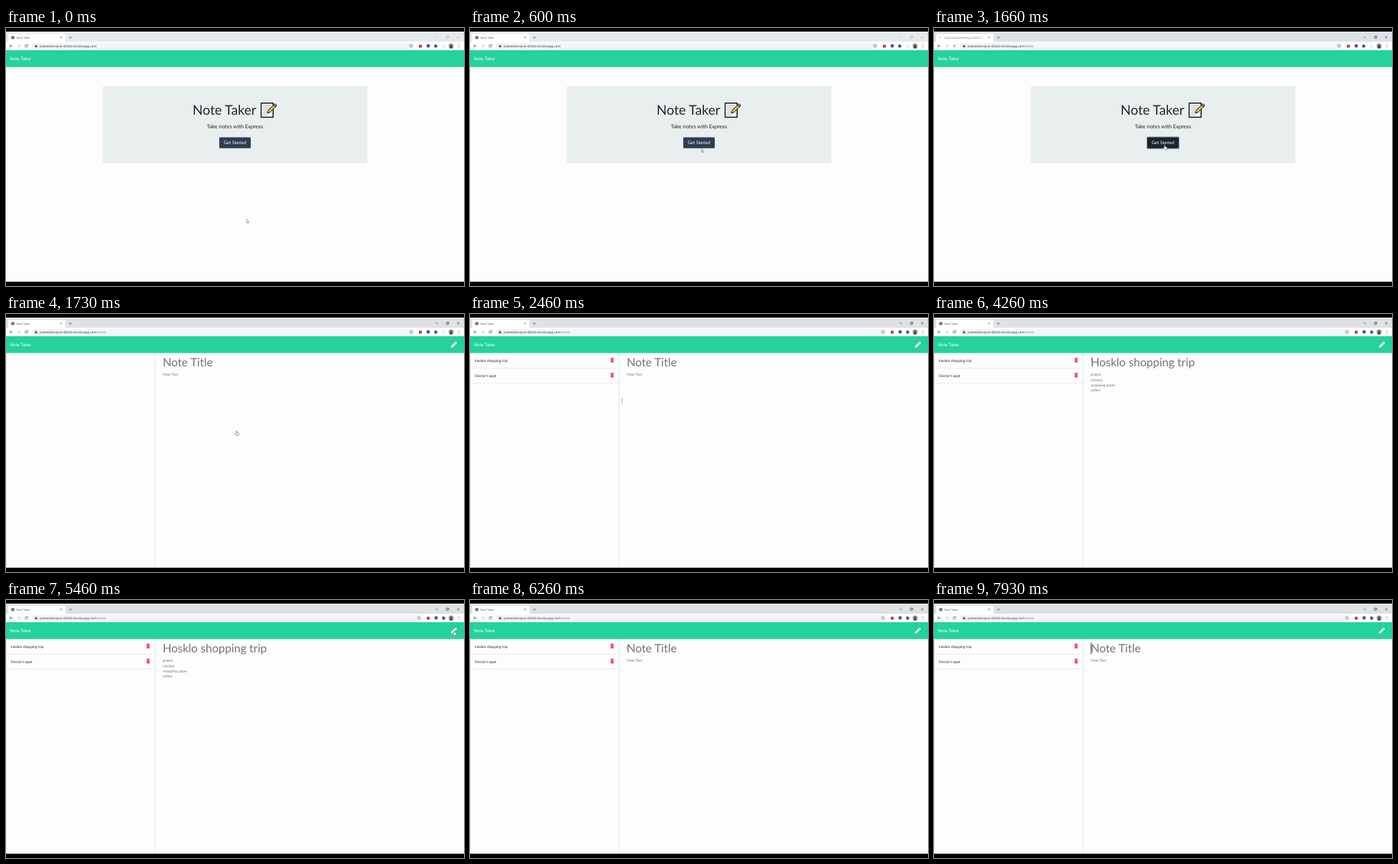
An HTML page with a canvas for the animation above (8000 ms loop, 640x360 px).

```html
<!DOCTYPE html>
<html lang="en">
<head>
<meta charset="utf-8">
<title>Note Taker</title>
<style>
  html, body { margin: 0; width: 100%; height: 100%; overflow: hidden; background: #000; }
  canvas { display: block; width: 100%; height: 100%; }
</style>
</head>
<body>
<canvas id="stage"></canvas>
<script>
const W = 640, H = 360, LOOP = 8000, STEP = 200 / 3;
const canvas = document.getElementById('stage');
const ctx = canvas.getContext('2d');
const PAGE_FONT = 'Lato, sans-serif';
const UI_FONT = '"Open Sans", "Noto Sans", sans-serif';
const STORE = 'Hosklo shopping trip';
const ITEMS = ['grapes', 'chicken', 'wrapping paper', 'coffee'];

// Moments at which the interface switches, in ms
const AT = {
  hover: 860, press: 1260, load: 1330, commit: 1600, notes: 1730, list: 1800,
  icons: 2000, open: 3660, clear: 5600
};
const CARET = [[6000, 6260], [6860, 7400], [7930, LOOP]];

// Pointer moves: start, end, x, y
const MOVES = [
  [0, 600, 323.5, 168], [666, 866, 322.3, 162.8],
  [2200, 2533, 200, 116], [2733, 3266, 115.5, 65.6],
  [3933, 4066, 135, 67], [4133, 4333, 250, 62],
  [4866, 5266, 622, 44], [5400, 5466, 626.4, 42.4],
  [5600, 6000, 219.5, 67]
];

function box(x, y, w, h, fill, r = 0) {
  ctx.fillStyle = fill;
  ctx.beginPath();
  ctx.roundRect(x, y, w, h, r);
  ctx.fill();
}

function disc(x, y, r, fill) {
  ctx.fillStyle = fill;
  ctx.beginPath();
  ctx.arc(x, y, r, 0, 7);
  ctx.fill();
}

function arc(x, y, r, from, to, color, width) {
  ctx.strokeStyle = color;
  ctx.lineWidth = width;
  ctx.beginPath();
  ctx.arc(x, y, r, from, to);
  ctx.stroke();
}

function line(points, color, width) {
  ctx.strokeStyle = color;
  ctx.lineWidth = width;
  ctx.beginPath();
  for (let i = 0; i < points.length; i += 2) ctx.lineTo(points[i], points[i + 1]);
  ctx.stroke();
}

function shape(points, fill) {
  ctx.fillStyle = fill;
  ctx.beginPath();
  for (let i = 0; i < points.length; i += 2) ctx.lineTo(points[i], points[i + 1]);
  ctx.closePath();
  ctx.fill();
}

function cross(x, y, r, color, width = 0.6) {
  line([x - r, y - r, x + r, y + r], color, width);
  line([x - r, y + r, x + r, y - r], color, width);
}

function text(str, x, y, size, color, font = PAGE_FONT, align = 'left') {
  ctx.font = `${size}px ${font}`;
  ctx.textAlign = align;
  ctx.fillStyle = color;
  ctx.fillText(str, x, y);
}

function at(x, y, draw) {
  ctx.save();
  ctx.translate(x, y);
  draw();
  ctx.restore();
}

function drawTab(ms, loading) {
  const focused = ms >= AT.press;
  box(0, 5, W, 14.5, focused ? '#dee1e6' : '#e7eaed');
  box(3, 8, 80, 12, '#fff', [2.5, 2.5, 0, 0]);
  if (loading) {
    const a = ms / 110;
    arc(9.5, 13.3, 1.9, a, a + 1.6, '#9aa0a6', 0.6);
  } else {
    disc(9.5, 13.3, 2.4, '#55595e');
    line([7.8, 12.6, 9.2, 13.2, 8.9, 14.8], '#d5d8db', 0.6);
    line([10, 11.6, 10.4, 12.9, 11.3, 13.6], '#d5d8db', 0.6);
  }
  if (ms >= AT.commit && ms < AT.notes) {
    const fade = ctx.createLinearGradient(60, 0, 73, 0);
    fade.addColorStop(0, '#5f6368');
    fade.addColorStop(1, 'rgba(95,99,104,0)');
    text('https://protected-eyrie-40326.h', 14.5, 14.7, 3.75, fade, UI_FONT);
  } else {
    text('Note Taker', 14.5, 14.7, 3.75, '#4b4f54', UI_FONT);
  }
  cross(77, 13.3, 1.2, '#5f6368');
  line([88, 13.3, 92, 13.3], '#5f6368', 0.6);
  line([90, 11.3, 90, 15.3], '#5f6368', 0.6);

  const ctl = focused ? '#202124' : '#a9adb2';
  line([600, 13, 603.4, 13], ctl, 0.5);
  ctx.strokeStyle = ctl;
  ctx.lineWidth = 0.5;
  ctx.strokeRect(615.3, 11.9, 2.6, 2.6);
  line([616.2, 11.9, 616.2, 11.1, 618.7, 11.1, 618.7, 13.6, 617.9, 13.6], ctl, 0.4);
  cross(632, 13, 1.6, ctl, 0.5);
}

function drawToolbar(ms, loading) {
  const shift = ms >= AT.icons ? 11 : 0;
  box(0, 19.5, W, 11.5, '#fff');
  box(36, 20.7, 536 + shift, 9.2, '#f4f5f6', 4.6);
  const ink = '#4f5358';
  line([9.4, 25, 5.2, 25], ink, 0.7);
  line([7.2, 23, 5.2, 25, 7.2, 27], ink, 0.7);
  line([16, 25, 20, 25], '#b9bcc0', 0.7);
  line([18, 23, 20, 25, 18, 27], '#b9bcc0', 0.7);
  if (loading) {
    cross(28.5, 25, 1.7, ink, 0.7);
  } else {
    arc(28.5, 25, 1.9, 0.3, 5.4, ink, 0.7);
    shape([30.8, 22.7, 30.8, 24.8, 28.7, 24.8], ink);
  }
  box(40.4, 24.4, 3.2, 2.6, ink, 0.4);
  arc(42, 24.4, 1, Math.PI, 0, ink, 0.5);
  text('protected-eyrie-40326.herokuapp.com', 47, 26.6, 4.45, '#2b2e32', UI_FONT);
  if (ms >= AT.commit) {
    const w = ctx.measureText('protected-eyrie-40326.herokuapp.com').width;
    text('/notes', 47 + w, 26.6, 4.45, '#75797e', UI_FONT);
  }

  at(566 + shift, 25, () => {
    const star = [];
    for (let i = 0; i <= 10; i++) {
      const a = i * Math.PI / 5 - Math.PI / 2, r = i % 2 ? 1.1 : 2.5;
      star.push(r * Math.cos(a), r * Math.sin(a));
    }
    line(star, '#5f6368', 0.5);
  });
  box(577 + shift, 23.4, 4, 4, '#d9303c');
  disc(590 + shift, 25, 2.4, '#4a5a92');
  at(600.3 + shift, 25, () => {
    box(-2, -1.3, 3.8, 3.6, '#4f5358', 0.4);
    disc(-0.2, -1.6, 0.9, '#4f5358');
    disc(2, 0.4, 0.9, '#4f5358');
    disc(-1.9, 0.5, 0.7, '#fff');
  });
  if (!shift) {
    line([609, 23.6, 613, 23.6], '#c3c6ca', 0.5);
    line([609, 25.2, 611.6, 25.2], '#c3c6ca', 0.5);
    line([609, 26.8, 611, 26.8], '#c3c6ca', 0.5);
    disc(612.7, 26.4, 0.8, '#c3c6ca');
  }
  disc(622, 25, 3.5, '#a99a90');
  ctx.save();
  ctx.beginPath();
  ctx.arc(622, 25, 3.5, 0, 7);
  ctx.clip();
  disc(622, 24.4, 1.5, '#51413b');
  disc(622, 28.3, 2.5, '#51413b');
  ctx.restore();
  for (let i = -1; i <= 1; i++) disc(632.8, 25 + i * 1.6, 0.5, '#4f5358');
}

function drawHeader(ms) {
  box(0, 31, W, 23.5, '#25d29d');
  text('Note Taker', 5.3, 45.2, 6.25, '#fff');
  if (ms < AT.notes) return;
  at(625.6, 43, () => {
    ctx.rotate(-Math.PI / 4);
    box(-3.6, -1.5, 6.3, 3, '#fff');
    box(3.2, -1.5, 2, 3, '#fff', 0.6);
    shape([-3.6, -1.5, -3.6, 1.5, -5.6, 0], '#fff');
  });
}

function drawMemo() {
  ctx.lineJoin = 'round';
  box(356.3, 104.6, 17.2, 20, '#f4f6f6', 1);
  ctx.strokeStyle = '#16191b';
  ctx.lineWidth = 1.5;
  ctx.strokeRect(356.5, 104.8, 16.8, 19.6);
  for (let i = 0; i < 6; i++) {
    line([359, 108.5 + i * 2.5, i === 5 ? 366 : 371, 108.5 + i * 2.5], '#9ea5a8', 0.7);
  }
  at(377, 107, () => {
    ctx.rotate(2.36);
    box(-0.6, -2.1, 14.6, 4.2, '#16191b', 0.8);
    box(0.2, -1.3, 1.8, 2.6, '#e8777d');
    box(2.6, -1.3, 10.4, 2.6, '#f5c83c');
    shape([14, -2.1, 14, 2.1, 17.4, 0], '#16191b');
    shape([13, -1.3, 13, 1.3, 15, 0.4, 15, -0.4], '#f1d9b0');
  });
  ctx.lineJoin = 'miter';
}

function drawHome(ms) {
  box(135, 81.3, 370, 107.7, '#e9efee', 1.8);
  text('Note Taker', 260.8, 121, 18.67, '#212529');
  drawMemo();
  text('Take notes with Express', 320, 140, 7.5, '#212529', PAGE_FONT, 'center');
  const pressed = ms >= AT.press;
  if (pressed) box(297, 151.5, 46, 17.4, '#8d9ba6', 2);
  box(298, 152.6, 44, 15.2, pressed ? '#1a252f' : ms >= AT.hover ? '#1e2b37' : '#2c3e50', 1.4);
  text('Get Started', 320, 162.3, 6.25, '#fff', PAGE_FONT, 'center');
}

function drawTrash(x, y) {
  box(x - 2.3, y - 2.9, 4.6, 1, '#e0323e', 0.3);
  box(x - 0.8, y - 3.3, 1.6, 0.7, '#e0323e');
  box(x - 2, y - 1.6, 4, 4.8, '#e0323e', 0.5);
  for (let i = -1; i <= 1; i++) box(x + i * 1.1 - 0.15, y - 0.9, 0.3, 3.3, '#f6b9bd');
}

function drawNotes(ms) {
  box(0, 54.5, 0.7, 299.5, '#dcdddd');
  box(207.9, 54.5, 0.7, 299.5, '#d9dada');
  if (ms >= AT.list) {
    [STORE, "Doctor's appt"].forEach((name, i) => {
      const y = 64.2 + i * 21;
      text(name, 7, y + 2.6, 5, '#212529');
      drawTrash(198.6, y);
      box(0, y + 11.2, 208, 0.6, '#d9dada');
    });
  }
  const open = ms >= AT.open && ms < AT.clear;
  text(open ? STORE : 'Note Title', 219, 73.2, 16, '#737373');
  (open ? ITEMS : ['Note Text']).forEach((s, i) => text(s, 219, 86.2 + i * 7.4, 5, '#757575'));
  if (CARET.some(([a, b]) => ms >= a && ms < b)) box(218.9, 59.3, 0.8, 16.6, '#333');
}

function pointerAt(ms) {
  let x = 336, y = 266.6;
  for (const [from, to, tx, ty] of MOVES) {
    if (ms <= from) break;
    const p = Math.min(1, (ms - from) / (to - from));
    const e = p * p * (3 - 2 * p);
    x += (tx - x) * e;
    y += (ty - y) * e;
  }
  return [x, y];
}

function pointerKind(ms, x, y) {
  if (ms < AT.notes) return x > 298 && x < 342 && y > 152 && y < 168 ? 'hand' : 'arrow';
  if (ms < 2260) return 'hand';
  if (y < 54.5) return x > 620 ? 'hand' : 'arrow';
  if (x > 208) return 'beam';
  return y < 97 ? 'hand' : 'arrow';
}

const POINTERS = {
  arrow() {
    const outline = [0, 0, 0, 5.2, 1.2, 4.1, 2, 5.9, 2.8, 5.5, 2, 3.8, 3.6, 3.7, 0, 0];
    shape(outline, '#fff');
    line(outline, '#3a3a3a', 0.4);
  },
  hand() {
    const outline = [-0.5, 0.3, 0.5, 0.3, 0.6, 2.6, 3, 3.2, 3.3, 4.2, 2.7, 6.8,
      -0.5, 6.8, -2.1, 4.5, -1.7, 3.7, -0.5, 4.5, -0.5, 0.3];
    shape(outline, '#fff');
    line(outline, '#3a3a3a', 0.45);
  },
  beam() {
    line([0, -2.8, 0, 2.8], '#444', 0.4);
    line([-1, -2.8, 1, -2.8], '#777', 0.35);
    line([-1, 2.8, 1, 2.8], '#777', 0.35);
  }
};

function draw(ms) {
  const loading = ms >= AT.load && ms < AT.notes;
  box(0, 0, W, H, '#000');
  box(0, 5, W, 349, '#fdfdfd');
  drawTab(ms, loading);
  drawToolbar(ms, loading);
  drawHeader(ms);
  (ms < AT.notes ? drawHome : drawNotes)(ms);
  const [x, y] = pointerAt(ms);
  at(x, y, POINTERS[pointerKind(ms, x, y)]);
}

function resize() {
  const scale = window.devicePixelRatio || 1;
  canvas.width = Math.round(innerWidth * scale);
  canvas.height = Math.round(innerHeight * scale);
}

const start = performance.now();

function tick() {
  const t = (performance.now() - start) % LOOP;
  const ms = Math.floor((t + 7) / STEP) * STEP % LOOP;
  ctx.setTransform(canvas.width / W, 0, 0, canvas.height / H, 0, 0);
  ctx.textRendering = 'geometricPrecision';
  draw(ms);
  requestAnimationFrame(tick);
}

addEventListener('resize', resize);
resize();
tick();
</script>
</body>
</html>
```
